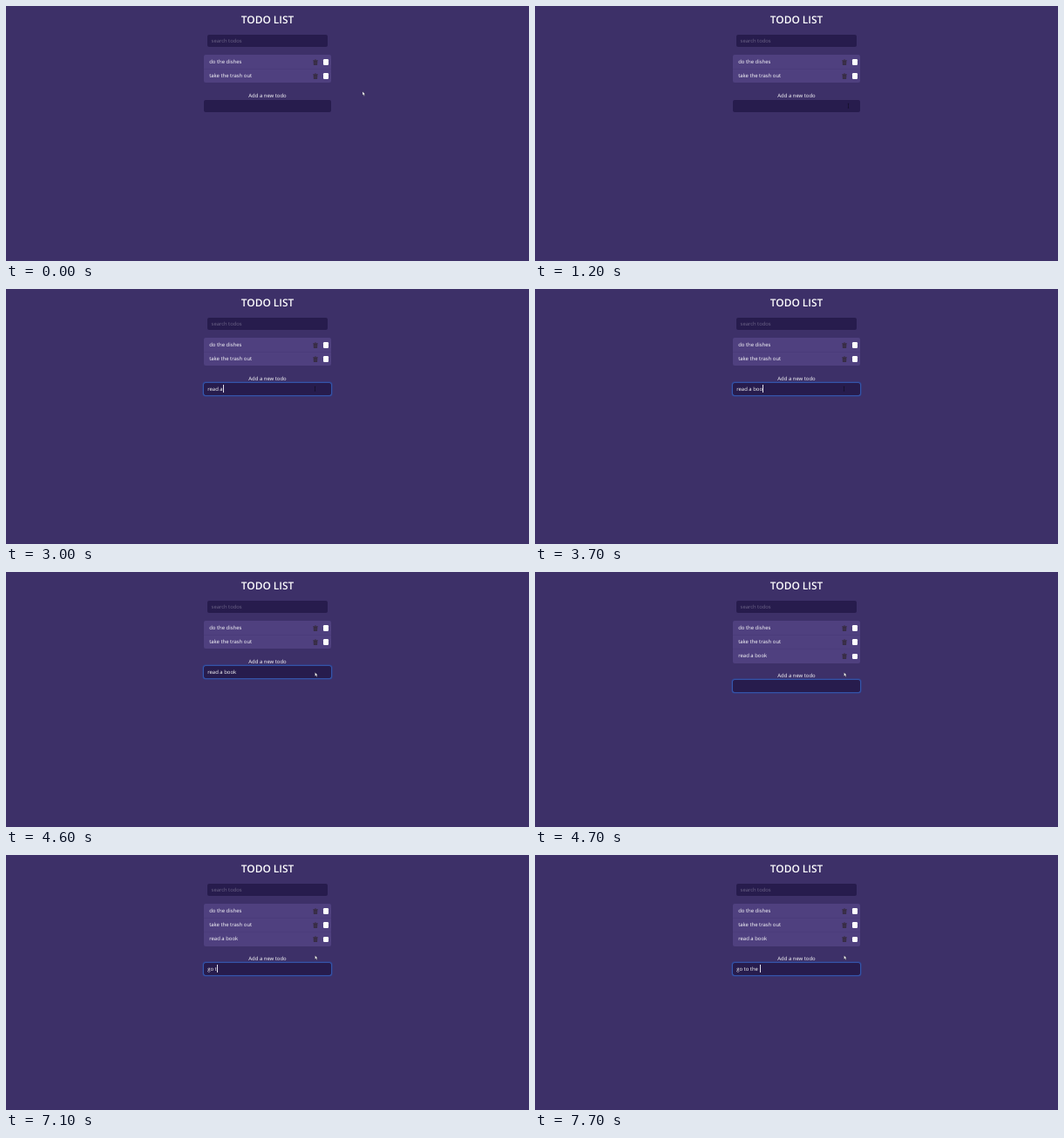
These frames come from a looping animation (600 px wide and 293 px high, 8 s). An HTML page:

```html
<!DOCTYPE html>
<html lang="en">
<head>
<meta charset="utf-8">
<title>Todo list</title>
<style>
  html, body { margin: 0; width: 100%; height: 100%; overflow: hidden; background: #3d3068; }
  body {
    position: relative; color: #fff;
    font: 5.95px "Open Sans", "Noto Sans", sans-serif;
    text-rendering: geometricPrecision;
  }
  body > * { position: absolute; box-sizing: border-box; white-space: pre; }
  #title { left: 200px; top: 9px; width: 200px; font-size: 11.9px; font-weight: 600; line-height: 14px; text-align: center; }
  .field { height: 14px; line-height: 14px; padding-left: 4.6px; border-radius: 2px; background: #271c4d; }
  #search { left: 231px; top: 33px; width: 137.6px; color: #6d6588; font-size: 5.85px; }
  #list { left: 226.6px; top: 56.2px; width: 146.8px; border-radius: 2px; overflow: hidden; background: #4f407f; }
  .row { position: relative; height: 16.15px; padding-left: 6.6px; line-height: 16.4px; }
  .row + .row { box-shadow: inset 0 .5px #483978; }
  .row svg { position: absolute; left: 125px; top: 4.7px; }
  .row i { position: absolute; left: 137.2px; top: 5.1px; width: 6.3px; height: 6.3px; border-radius: 1.2px; background: #fff; }
  #label { left: 200px; top: 97.9px; width: 200px; line-height: 10px; text-align: center; }
  #entry { left: 226.6px; top: 107.5px; width: 146.8px; }
  #entry.focus { box-shadow: 0 0 0 .6px #3c63bd, 0 0 0 1.5px rgba(38, 82, 176, .6); }
  #caret { display: inline-block; width: .7px; height: 8.4px; margin-left: .2px; vertical-align: -2px; background: #e4e1ee; }
  #arrow, #beam { left: 0; top: 0; }
</style>
</head>
<body>
<div id="title">TODO LIST</div>
<div id="search" class="field">search todos</div>
<div id="list"></div>
<div id="label">Add a new todo</div>
<div id="entry" class="field"><span id="typed"></span><span id="caret"></span></div>
<svg id="arrow" width="6" height="8"><path d="M.4.4V5L1.5 4.1 2.3 5.8 3.2 5.4 2.4 3.8H3.7Z" fill="#fff" stroke="#17122a" stroke-width=".4"/></svg>
<svg id="beam" width="4" height="7"><path d="M.8.6H2.2M1.5.6V5.6M.8 5.6H2.2" fill="none" stroke="#110c22" stroke-width=".6"/></svg>
<script>
const LOOP = 8000, ADDED = 4700, ROW = 16.15;
const $ = id => document.getElementById(id);

// Each table lists [start in ms, value...].
const pointer = [
  [0, "arrow", 408.5, 97.6], [100, "arrow", 395, 101], [200, "arrow", 374, 104],
  [300, "arrow", 365, 105], [1200, "beam", 358, 111.5], [1300, "beam", 353, 111.5],
  [4600, "arrow", 354, 114.8]
];
const typing = [
  [0, ""], [1800, "r"], [2000, "re"], [2100, "rea"], [2300, "read"], [2700, "read "],
  [3000, "read a"], [3200, "read a "], [3300, "read a b"], [3500, "read a bo"],
  [3700, "read a boo"], [3800, "read a book"], [ADDED, ""],
  ...[..."go to t"].map((_, i) => [6800 + i * 100, "go to t".slice(0, i + 1)]),
  [7600, "go to the"], [7700, "go to the "]
];
const caret = [
  [0, false], [1300, true], [4400, false], [4900, true],
  [5400, false], [6000, true], [6500, false], [6800, true]
];

const at = (table, t) => table.findLast(step => step[0] <= t);

const trash = `<svg width="6" height="8" fill="#372d43">
  <path d="M.2 1H1.9L2.2.4H3.8L4.1 1H5.8V1.8H.2ZM.6 2.1H5.4L5.1 7.1H.9Z"/>
  <path d="M2 2.9V6.3M3 2.9V6.3M4 2.9V6.3" stroke="#463962" stroke-width=".3"/></svg>`;
$("list").innerHTML = ["do the dishes", "take the trash out", "read a book"]
  .map(text => `<div class="row">${text}${trash}<i></i></div>`).join("");

function draw(now) {
  const t = now % LOOP;
  const added = t >= ADDED;
  const shift = `translateY(${added ? 16 : 0}px)`;
  $("list").style.height = ROW * (added ? 3 : 2) + "px";
  $("label").style.transform = $("entry").style.transform = shift;
  $("entry").classList.toggle("focus", t >= 1300);
  $("typed").textContent = at(typing, t)[1];
  $("caret").style.opacity = at(caret, t)[1] ? 1 : 0;

  const [, kind, x, y] = at(pointer, t);
  for (const id of ["arrow", "beam"]) {
    $(id).style.display = id === kind ? "block" : "none";
    $(id).style.transform = `translate(${x}px, ${y}px)`;
  }
}

const start = performance.now();
function tick() {
  draw(performance.now() - start);
  requestAnimationFrame(tick);
}
tick();
</script>
</body>
</html>
```
